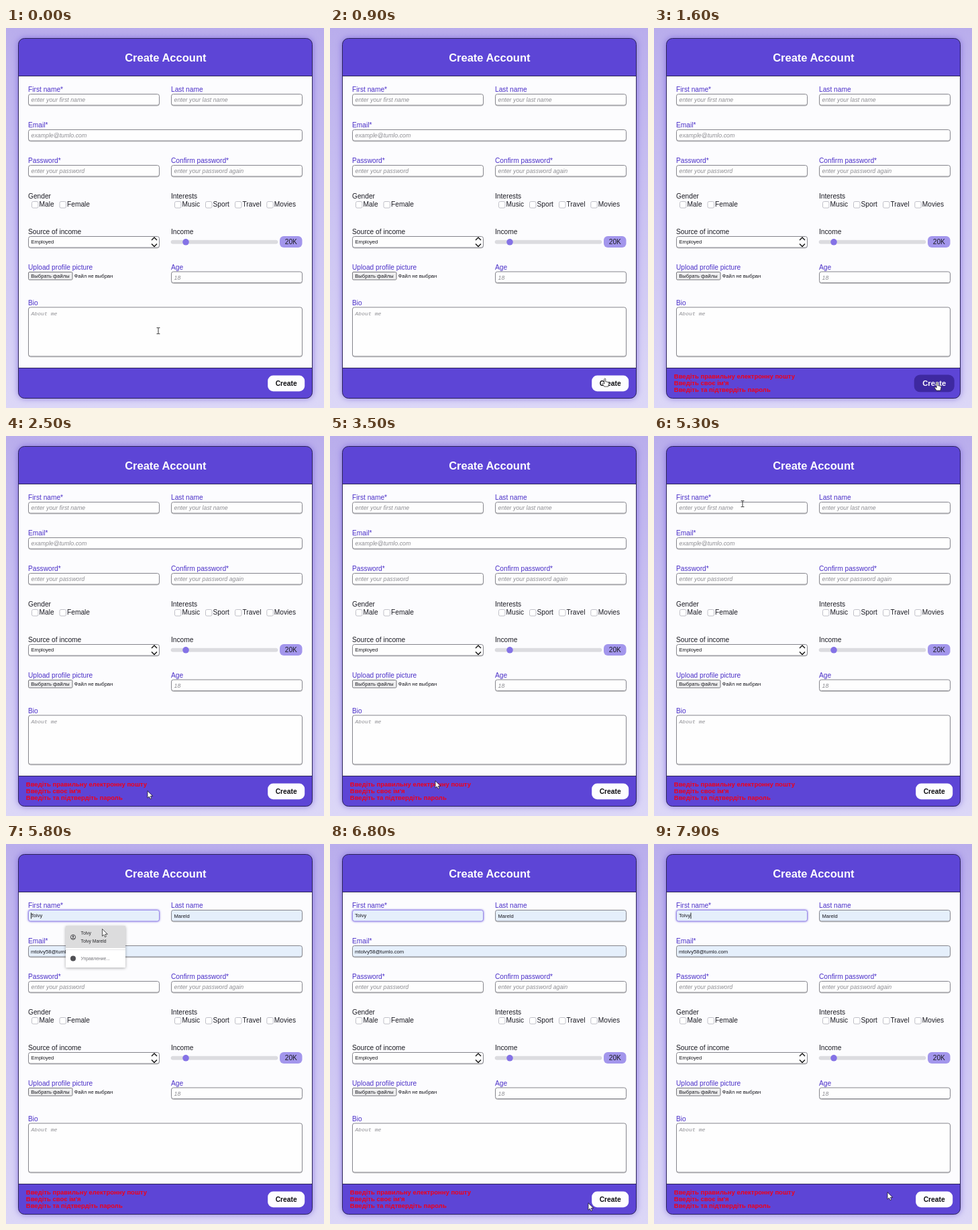
Write an HTML page that moves like this. It is 474 by 566 pixels and loops after 8 s.

```html
<!DOCTYPE html>
<html lang="en">
<head>
<meta charset="utf-8">
<title>Create Account</title>
<style>
  html, body { margin: 0; width: 100%; height: 100%; overflow: hidden; }
  svg { display: block; width: 474px; height: 566px; font-family: "Liberation Sans", Arial, sans-serif;
    background: linear-gradient(#b9adec, #cbc3f2 50%, #dcd7f7); }
  text { white-space: pre; }
  .title { font: bold 16.5px "Liberation Sans", Arial, sans-serif; fill: #fff; }
  .label { font-size: 10.2px; fill: #4b30c8; }
  .dark { fill: #1c1c24; }
  .hint { font-size: 8.8px; font-style: italic; fill: #8d8d92; }
  .mono { font-size: 8.1px; font-family: "Liberation Mono", monospace; }
  .value { font-size: 7.6px; fill: #16161c; }
  .menu { font-size: 6.8px; fill: #2b2b2e; }
  .error { font-size: 9.5px; font-weight: bold; fill: #f00018; }
  .field { fill: #fefefe; stroke: #85858c; filter: drop-shadow(0 1px .5px #0003); }
  .filled { fill: #e5effb; }
  .box { fill: #fff; stroke: #b9b9c2; stroke-width: .9; }
  .card { filter: drop-shadow(0 0 5px #5d45d699); }
  .pop { filter: drop-shadow(0 1px 2px #0005); }
  .pointer { stroke-linejoin: round; stroke-linecap: round; }
</style>
</head>
<body>
<svg id="stage" viewBox="0 0 474 566"></svg>
<script>
const LOOP = 8000, STEP = 100;
const CLICK = 1300, FOCUS = 5500, PREVIEW = 5700, ACCEPT = 5900;
const FIRST = 'Tolvy', LAST = 'Mareld', MAIL = 'mtolvy58@tumlo.com';
const stage = document.getElementById('stage');

function add(tag, attrs, parent = stage) {
  const el = document.createElementNS('http://www.w3.org/2000/svg', tag);
  for (const k in attrs) el.setAttribute(k, attrs[k]);
  return parent.appendChild(el);
}
function rect(x, y, width, height, rx, attrs, parent) {
  return add('rect', { x, y, width, height, rx, ...attrs }, parent);
}
function text(str, x, y, cls, parent, attrs) {
  const el = add('text', { x, y, class: cls, ...attrs }, parent);
  el.textContent = str;
  return el;
}
function path(d, attrs, parent) {
  return add('path', { d, fill: 'none', ...attrs }, parent);
}
function show(el, on) {
  el.style.display = on ? '' : 'none';
}

// Card
const card = add('g', { class: 'card' });
rect(18.5, 15.5, 438, 536, 9, { fill: '#5d45d6', stroke: '#2b2358' }, card);
rect(19, 72, 437, 434, 0, { fill: '#fcfcfe' });
path('M19 71.5H456M19 506.5H456', { stroke: '#2b2358' });
text('Create Account', 237.8, 49.5, 'title', stage, { 'text-anchor': 'middle' });

// Text inputs: label, hint, x, y, width, height
const inputs = [
  ['First name*', 'enter your first name', 33, 98, 196, 17.5],
  ['Last name', 'enter your last name', 246, 98, 196, 17.5],
  ['Email*', 'example@tumlo.com', 33, 151, 409, 17.5],
  ['Password*', 'enter your password', 33, 204, 196, 17.5],
  ['Confirm password*', 'enter your password again', 246, 204, 196, 17.5],
  ['Age', '18', 246, 362.5, 196, 17.5],
  ['Bio', 'About me', 33, 415.5, 409, 74]
].map(([label, hint, x, y, w, h]) => {
  text(label, x, y - 2.6, 'label');
  const field = rect(x + .5, y + .5, w - 1, h - 1, 3, { class: 'field' });
  const cls = label === 'Bio' ? 'hint mono' : 'hint';
  return { x, y, w, h, field, hint: text(hint, x + 4.5, y + 12, cls) };
});

// Choices
[['Gender', 33, 254], ['Interests', 246, 254], ['Source of income', 33, 307], ['Income', 246, 307]]
  .forEach(([s, x, y]) => text(s, x, y, 'label dark'));
[['Male', 38], ['Female', 79.5], ['Music', 251], ['Sport', 297], ['Travel', 341], ['Movies', 388.3]]
  .forEach(([s, x]) => {
    rect(x + .5, 258.5, 9.5, 9.5, 2, { class: 'box' });
    text(s, x + 11.5, 266.3, 'label dark');
  });

// Select, slider and file picker
rect(33.5, 310.5, 195, 16.5, 3, { class: 'field' });
text('Employed', 37.5, 321.3, 'value');
path('M217 316l4-4 4 4M217 321.5l4 4 4-4', { stroke: '#111', 'stroke-width': 1.4 });
rect(246, 316.2, 159, 5, 2.5, { fill: '#dcdce0', stroke: '#cfcfd4', 'stroke-width': .5 });
add('circle', { cx: 268, cy: 318.8, r: 4.8, fill: '#8472e6' });
rect(408, 310, 33.5, 17, 6, { fill: '#a396ec' });
text('20K', 424.8, 322.2, 'label dark', stage, { 'text-anchor': 'middle' });
text('Upload profile picture', 33, 360, 'label');
rect(33.5, 363.5, 65.5, 11.5, 1.5, { fill: '#efeff0', stroke: '#77777c' });
text('Выбрать файлы', 37.3, 372, 'value');
text('Файл не выбран', 101.5, 372, 'value');

// Autofilled values
const [first, last, mail] = inputs;
const values = add('g');
const firstText = text(FIRST, 37, 109.3, 'value', values);
text(LAST, 250.5, 109.8, 'value', values);
text(MAIL, 37, 162.5, 'value', values);
const caret = rect(37, 102.3, .9, 9, 0, { fill: '#111' });

// Suggestion list
const menu = add('g');
rect(89, 122, 89, 62, 1, { fill: '#fff', class: 'pop' }, menu);
const hovered = rect(89, 122, 89, 33, 0, { fill: '#dcdcdd' }, menu);
path('M89 157.5H178', { stroke: '#e6e6e8' }, menu);
add('circle', { cx: 100, cy: 138.8, r: 3.6, fill: 'none', stroke: '#48484c' }, menu);
add('circle', { cx: 100, cy: 137.7, r: 1.2, fill: '#48484c' }, menu);
path('M97.8 141q2.2-2 4.4 0', { stroke: '#48484c' }, menu);
add('circle', { cx: 100, cy: 170.5, r: 4, fill: '#505054' }, menu);
text(FIRST, 111.5, 135.3, 'menu', menu);
text(FIRST + ' ' + LAST, 111.5, 147.3, 'menu', menu);
text('Управление...', 111.5, 173, 'menu', menu, { style: 'fill:#77777c' });

// Footer
const errors = add('g');
['Введіть правильну електронну пошту', "Введіть своє ім'я", 'Введіть та підтвердіть пароль']
  .forEach((s, i) => text(s, 29.8, 521.6 + i * 10.1, 'error', errors));
const button = add('g');
const buttonBox = rect(-27.5, -11.8, 55, 23.6, 8, {}, button);
const buttonText = text('Create', 0, 3.6, '', button,
  { 'font-size': 10.3, 'font-weight': 'bold', 'text-anchor': 'middle' });

// Pointers, hot spot at 0,0
const pointers = {
  arrow: path('M0 0V10.2L2.4 8 4 11.6 5.8 10.8 4.3 7.3H7.4Z', { fill: '#fff', stroke: '#111', 'stroke-width': .7 }),
  beam: path('M-2-4.5H-.5L0-4 .5-4.5H2M0-4V4M-2 4.5H-.5L0 4 .5 4.5H2', { stroke: '#222', 'stroke-width': .9 }),
  hand: path('M-1 .5Q0-1 1 .5V4.5L5 5.5Q6.2 6 6 7.5L5 12H-1L-4 7.5Q-4-.5 6-1 7.5Z',
    { fill: '#fff', stroke: '#111', 'stroke-width': .7 })
};
pointers.hand.setAttribute('d', 'M-1 .5Q0-1 1 .5V4.5L5 5.5Q6.2 6 6 7.5L5 12H-1L-4 7.5Q-3.5 6-1 7.5Z');
for (const k in pointers) pointers[k].classList.add('pointer');

// Pointer stops: time, x, y
const stops = [
  [0, 227, 451], [300, 235, 455], [1000, 420, 526], [1300, 422, 528], [1900, 422, 528],
  [2200, 330, 534], [2500, 211, 529], [2700, 150, 530], [3100, 80, 520], [3500, 157, 514],
  [3700, 166, 518], [4100, 76, 531], [4500, 116, 516], [4600, 112, 508], [5100, 135, 105],
  [5300, 132, 101], [5500, 132, 103], [5700, 142, 126], [5800, 143.5, 127], [6400, 143.5, 127],
  [6800, 385, 535], [7200, 348, 519], [LOOP, 348, 519]
];

function pointerAt(t) {
  const i = stops.findIndex(s => s[0] > t);
  const [t0, x0, y0] = stops[i - 1], [t1, x1, y1] = stops[i];
  const u = (t - t0) / (t1 - t0), e = u * u * (3 - 2 * u);
  return [x0 + (x1 - x0) * e, y0 + (y1 - y0) * e];
}
const inside = (px, py, { x, y, w, h }) => px >= x && px <= x + w && py >= y && py <= y + h;
const buttonArea = { x: 390, y: 518, w: 55, h: 23.5 };

function hoverAt(t) {
  return Math.max(0, Math.min(1, (t - 900) / 200, (2200 - t) / 200));
}
function mix(a, b, u) {
  return `rgb(${a.map((v, i) => Math.round(v + (b[i] - v) * u))})`;
}

function draw(t) {
  const focused = t >= FOCUS, filled = t >= PREVIEW, accepted = t >= ACCEPT;
  show(errors, t >= CLICK);
  show(values, filled);
  show(menu, focused && !accepted);
  show(hovered, filled);
  for (const f of [first, last, mail]) {
    show(f.hint, !filled);
    f.field.classList.toggle('filled', filled);
  }
  first.field.style.stroke = focused ? '#9a8be9' : '';
  first.field.style.filter = focused ? 'drop-shadow(0 0 1.5px #7a66e0)' : '';
  const since = t - (accepted ? ACCEPT : FOCUS);
  show(caret, focused && since % 1000 < 500);
  caret.setAttribute('x', accepted ? 37.2 + firstText.getComputedTextLength() : 37);

  const h = hoverAt(t);
  button.setAttribute('transform', `translate(417.7 529.4) scale(${1 + .09 * h})`);
  buttonBox.setAttribute('fill', mix([253, 253, 255], [62, 41, 160], h));
  buttonText.setAttribute('fill', mix([12, 12, 16], [255, 255, 255], h));

  const [x, y] = pointerAt(t);
  const kind = inside(x, y, buttonArea) ? 'hand'
    : inputs.some(f => inside(x, y, f)) ? 'beam' : 'arrow';
  for (const k in pointers) show(pointers[k], k === kind);
  pointers[kind].setAttribute('transform', `translate(${x} ${y})`);
}

function tick() {
  const t = performance.now() % LOOP;
  draw(Math.floor(t / STEP) * STEP);
  requestAnimationFrame(tick);
}
tick();
</script>
</body>
</html>
```
